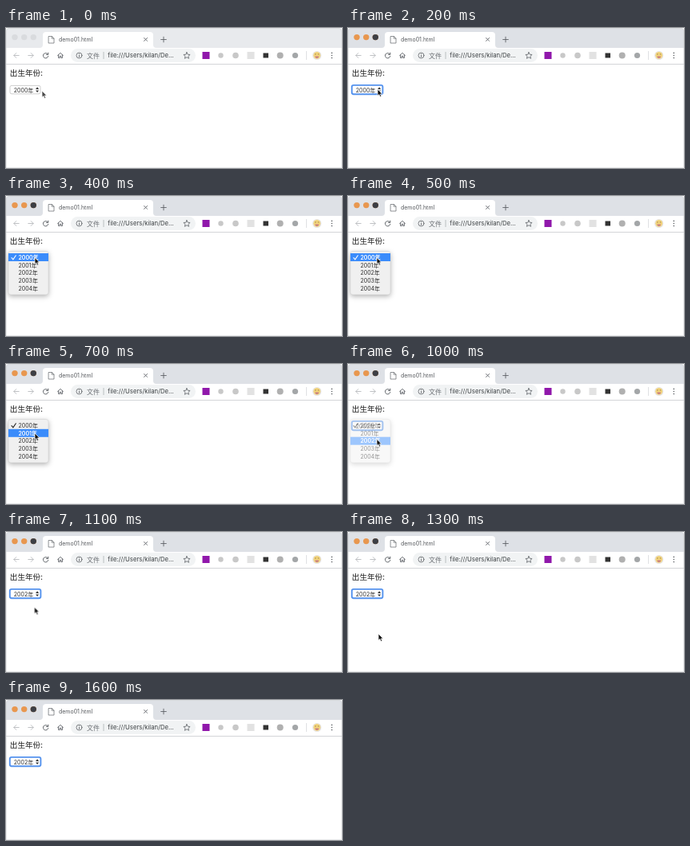
These frames come from a looping animation (420x176 px, 1.9 s). An HTML page:

```html
<!DOCTYPE html>
<html lang="zh-CN">
<head>
<meta charset="utf-8">
<title>Select menu</title>
<style>
html, body { margin: 0; width: 100%; height: 100%; overflow: hidden; background: #fff; }
svg { display: block; width: 420px; height: 176px; }
text { font-family: Inter, "Noto Sans CJK SC", "Noto Sans CJK", sans-serif; font-size: 7px; fill: #2c2c2c; }
.title { fill: #55585c; }
.label { font-size: 8px; font-weight: 350; fill: #6a6e73; }
.url { font-size: 7.75px; fill: #3c4043; }
.heading { font-family: "Noto Sans CJK SC", "Noto Sans CJK", sans-serif; font-size: 9.6px; font-weight: 350; fill: #1c1c1c; }
.line { fill: none; stroke: #5f6368; stroke-linecap: round; stroke-linejoin: round; }
.shadow { filter: drop-shadow(0 2px 3px rgba(0, 0, 0, .3)); }
.hot text { fill: #fff; font-weight: 600; }

.cursor, .active, .ring, .menu, .hot, .before, .after { animation: 1900ms step-end infinite; }
.cursor { animation-name: move; }
.active { animation-name: activate; }
.ring { animation-name: focus; }
.menu { animation-name: open; }
.first { animation-name: first; }
.second { animation-name: second; }
.third { animation-name: third; }
.before { animation-name: before; }
.after { animation-name: after; }

@keyframes move {
  0% { transform: translate(45px, 79px); opacity: .75; }
  5.26% { transform: translate(40px, 78px); opacity: 1; }
  10.52% { transform: translate(37px, 77px); }
  21.05% { transform: translate(36px, 77.5px); }
  31.57% { transform: translate(36px, 82px); }
  36.84% { transform: translate(36px, 87px); }
  42.1% { transform: translate(36px, 94.5px); }
  57.89% { transform: translate(35.5px, 94.5px); }
  63.15% { transform: translate(36px, 103px); }
  68.42% { transform: translate(38px, 128px); }
  73.68% { transform: translate(41px, 163px); }
  78.94%, 100% { transform: translate(44px, 190px); opacity: 1; }
}
@keyframes activate { 0% { opacity: 0; } 5.26%, 100% { opacity: 1; } }
@keyframes focus { 0% { opacity: 0; } 10.52%, 100% { opacity: 1; } }
@keyframes open {
  0% { opacity: 0; }
  21.05% { opacity: 1; }
  52.63% { opacity: .5; }
  57.89%, 100% { opacity: 0; }
}
@keyframes first { 0% { opacity: 1; } 36.84%, 100% { opacity: 0; } }
@keyframes second { 0% { opacity: 0; } 36.84% { opacity: 1; } 42.1%, 100% { opacity: 0; } }
@keyframes third { 0% { opacity: 0; } 42.1% { opacity: 1; } 47.36% { opacity: 0; } 52.63%, 100% { opacity: 1; } }
@keyframes before { 0% { opacity: 1; } 52.63%, 100% { opacity: 0; } }
@keyframes after { 0% { opacity: 0; } 52.63%, 100% { opacity: 1; } }
</style>
</head>
<body>
<svg viewBox="0 0 420 176">
  <defs>
    <path id="check" d="M7 77.6l1.9 2.2 3.4-5" fill="none" stroke-width="1.1" stroke-linecap="round"/>
    <rect id="bar" x="3" y="72" width="50" height="10" fill="#3b8cfb"/>
    <path id="strip" d="M0 25V4q0-4 4-4h412q4 0 4 4v21z"/>
    <g id="lights">
      <circle cx="11" cy="11.6" r="3.7"/>
      <circle cx="22.7" cy="11.6" r="3.7"/>
      <circle cx="34.3" cy="11.6" r="3.7"/>
    </g>
  </defs>

  <!-- Title bar, inactive then active -->
  <rect width="420" height="176" fill="#fff"/>
  <use href="#strip" fill="#e8eaed"/>
  <use href="#lights" fill="#d9dbde"/>
  <g class="active">
    <use href="#strip" fill="#dee1e6"/>
    <use href="#lights" fill="#e8974f"/>
    <circle cx="34.3" cy="11.6" r="3.7" fill="#3d3f45"/>
  </g>
  <path d="M42 25q4 0 4-4V9q0-4 4-4h130q4 0 4 4v12q0 4 4 4z" fill="#fff"/>
  <path class="line" d="M53.5 10.5h4l2.5 2.5v6h-6.5zM57.3 10.7v2.5h2.5" stroke-width=".7"/>
  <text class="title" x="66" y="17.2">demo01.html</text>
  <path class="line" d="M172.6 12.4l4 4m0-4l-4 4M193.7 14.5h6.6m-3.3-3.3v6.6" stroke-width=".9"/>

  <!-- Toolbar -->
  <g class="line" stroke-width="1">
    <path d="M16.2 34.5h-6.4m3-3l-3 3 3 3M27.8 34.5h6.4m-3-3l3 3-3 3" style="stroke:#bfc1c4"/>
    <path d="M52.2 32.8a3.2 3.2 0 1 0 .6 2.6m0-4.2v2.2h-2.2"/>
    <path d="M64.6 34.5l3.4-3.2 3.4 3.2m-5.8-.7v3.8h1.6v-2.3h1.6v2.3h1.6v-3.8" stroke-width=".9"/>
  </g>
  <rect x="81" y="26" width="156" height="17" rx="8.5" fill="#f1f3f4"/>
  <circle cx="91.5" cy="34.5" r="3.5" class="line" stroke-width=".8"/>
  <path class="line" d="M91.5 34.3v2m0-3.9v.1" stroke-width=".9"/>
  <text class="label" x="101" y="37.5">文件</text>
  <path d="M122 30v9" stroke="#aeb1b5" stroke-width=".8"/>
  <text class="url" x="127.3" y="37.4">file:///Users/kilan/De...</text>
  <path class="line" d="M226 30.5l1.2 2.7 2.9.3-2.2 2 .7 2.8-2.6-1.5-2.6 1.5.7-2.8-2.2-2 2.9-.3z" stroke-width=".8"/>

  <!-- Extensions -->
  <rect x="245.5" y="30" width="9" height="9" fill="#9018ab"/>
  <circle cx="268.5" cy="34.5" r="3.2" fill="#c8c8c8"/>
  <circle cx="287" cy="34.5" r="3.8" fill="#c8c8c8"/>
  <rect x="301.5" y="30" width="9" height="9" fill="#e2e2e2"/>
  <rect x="321.5" y="31.5" width="6.5" height="6" fill="#333"/>
  <circle cx="342.7" cy="34.5" r="4" fill="#b0b0b0"/>
  <circle cx="361.5" cy="34.5" r="3.6" fill="#a3a6a8"/>
  <path d="M375.5 29v11" stroke="#dfe1e3" stroke-width="1"/>
  <circle cx="388.7" cy="34.5" r="5.6" fill="#e6e4e4"/>
  <circle cx="388.7" cy="34.3" r="4.4" fill="#f3d57c"/>
  <path d="M386.1 33.1l1.6-.3m2 0l1.6.3" stroke="#8a6a3c" stroke-width=".8"/>
  <path d="M386.2 35.4h5q-.4 2.6-2.5 2.6t-2.5-2.6z" fill="#c98080"/>
  <g fill="#5f6368">
    <circle cx="407.3" cy="31.4" r=".8"/>
    <circle cx="407.3" cy="34.5" r=".8"/>
    <circle cx="407.3" cy="37.6" r=".8"/>
  </g>
  <path d="M0 45.5h420" stroke="#d3d5d8" stroke-width="1"/>

  <!-- Page -->
  <text class="heading" x="4.8" y="60.2">出生年份:</text>
  <rect x="5" y="72.4" width="38" height="10.4" rx="2" fill="#fff" stroke="#b9b9b9" stroke-width=".7"/>
  <rect class="ring" x="4.8" y="71.9" width="38.6" height="11.3" rx="2.2" fill="#fff" stroke="#5593ee" stroke-width="1.9"/>
  <text class="before" x="9.8" y="80.5">2000年</text>
  <text class="after" x="9.8" y="80.5">2002年</text>
  <path d="M37.1 77l2-2.7 2 2.7zM37.1 78.4l2 2.7 2-2.7z" fill="#333"/>

  <!-- Menu -->
  <g class="menu">
    <rect class="shadow" x="3" y="69.5" width="50" height="54.5" rx="3" fill="#f0f0f0" stroke="#cfcfcf" stroke-width=".5"/>
    <use href="#check" stroke="#222"/>
    <text x="15.5" y="79.6">2000年</text>
    <text x="15.5" y="89.5">2001年</text>
    <text x="15.5" y="99.3">2002年</text>
    <text x="15.5" y="109.2">2003年</text>
    <text x="15.5" y="119">2004年</text>
    <g class="hot first">
      <use href="#bar"/>
      <use href="#check" stroke="#fff"/>
      <text x="15.5" y="79.6">2000年</text>
    </g>
    <g class="hot second">
      <use href="#bar" y="9.8"/>
      <text x="15.5" y="89.5">2001年</text>
    </g>
    <g class="hot third">
      <use href="#bar" y="19.7"/>
      <text x="15.5" y="99.3">2002年</text>
    </g>
  </g>

  <path d="M.5 176V4Q.5.5 4 .5h412q3.5 0 3.5 3.5v171.5H0" fill="none" stroke="#d4d6d9" stroke-width=".5"/>
  <path class="cursor" d="M0 0v8.2l1.9-1.7 1.3 3 1.5-.7-1.3-2.9h2.5z" fill="#111" stroke="#fff" stroke-width=".7"/>
</svg>
</body>
</html>
```
